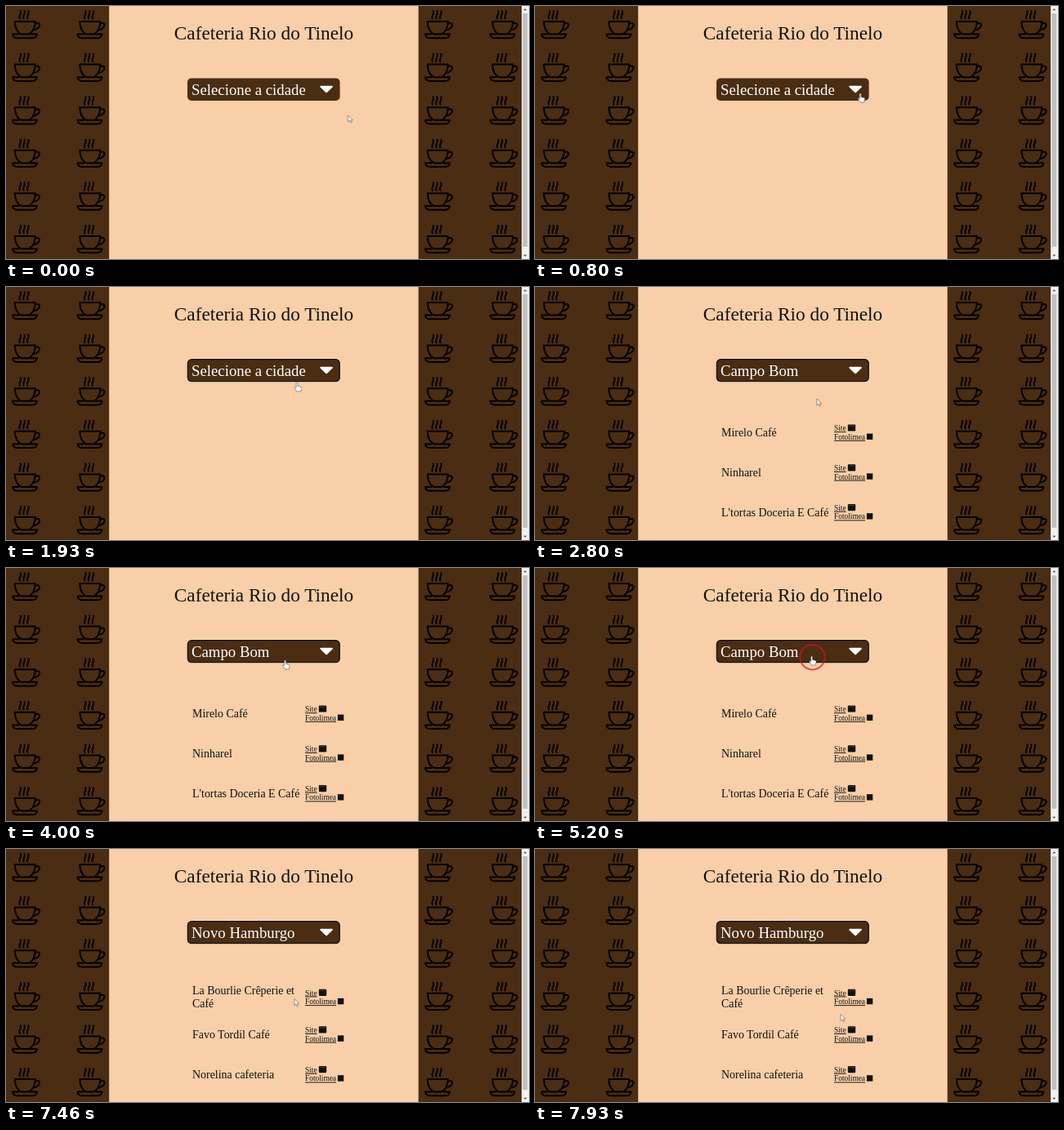
An HTML page for the animation above (8000 ms loop, 640 by 310 pixels).

```html
<!DOCTYPE html>
<html lang="pt-BR">
<head>
<meta charset="utf-8">
<title>Cafeteria</title>
<style>
  html, body { margin: 0; width: 100%; height: 100%; overflow: hidden; background: #4a2d13; }
  svg { display: block; width: 100vw; height: 100vh; }
  text { font-family: "Liberation Serif", "Times New Roman", serif; fill: #111; }
  .title { font-size: 23.3px; text-anchor: middle; }
  .choice { font-size: 18.8px; fill: #fff; }
  .name { font-size: 13.95px; }
  .link { font-size: 9.4px; text-decoration: underline; }

  .none, .focus, .first, .second, .arrow, .hand, .ring, .cursor {
    animation: 8s step-end infinite;
  }
  .none { animation-name: none-on; }
  .focus { animation-name: focus-on; }
  .first { animation-name: first-on; }
  .second { animation-name: second-on; }
  .arrow { animation-name: arrow-on; }
  .hand { animation-name: hand-on; }
  .ring { animation-name: click; }
  .cursor { animation-name: move; }

  @keyframes none-on { 0% { opacity: 1 } 34.125%, 100% { opacity: 0 } }
  @keyframes focus-on { 0% { opacity: 0 } 17.5%, 100% { opacity: 1 } }
  @keyframes first-on { 0% { opacity: 0 } 34.125% { opacity: 1 } 81.6%, 100% { opacity: 0 } }
  @keyframes second-on { 0% { opacity: 0 } 81.6%, 100% { opacity: 1 } }
  @keyframes arrow-on {
    0%, 35% { opacity: 1 } 9.1%, 49.1% { opacity: 0 } 82.5%, 100% { opacity: 1 }
  }
  @keyframes hand-on {
    0%, 35% { opacity: 0 } 9.1%, 49.1% { opacity: 1 } 82.5%, 100% { opacity: 0 }
  }
  @keyframes click {
    0%, 20%, 68.25%, 100% { opacity: 0 }
    17.5%, 65% { opacity: .7 }
    18.3%, 65.75% { opacity: .55 }
    19.15%, 67.5% { opacity: .3 }
  }
  /* The pointer is sampled about every 66 ms while it moves and rests in between. */
  @keyframes move {
    0% { transform: translate(418.5px, 134px) }
    .75% { transform: translate(418.5px, 134px); animation-timing-function: steps(4, jump-start) }
    4.08% { transform: translate(417px, 133px) }
    6.625% { transform: translate(417px, 133px); animation-timing-function: steps(5, jump-start) }
    10.8% { transform: translate(397.5px, 107px); animation-timing-function: steps(7, jump-start) }
    16.6% { transform: translate(386px, 105px) }
    22.5% { transform: translate(386px, 105px); animation-timing-function: steps(3, jump-start) }
    24.9% { transform: translate(355.5px, 117px) }
    34.125% { transform: translate(345px, 137px) }
    45% { transform: translate(345px, 137px); animation-timing-function: steps(7, jump-start) }
    50.8% { transform: translate(341px, 113px); animation-timing-function: steps(4, jump-start) }
    54.1% { transform: translate(338px, 108px) }
    81.6% { transform: translate(332.5px, 166px) }
    88.25% { transform: translate(332.5px, 166px); animation-timing-function: steps(4, jump-start) }
    91.6% { transform: translate(350px, 181px) }
    93.25% { transform: translate(350px, 181px); animation-timing-function: steps(8, jump-start) }
    99.85%, 100% { transform: translate(374px, 202.5px) }
  }
</style>
</head>
<body>
<svg viewBox="0 0 640 310" preserveAspectRatio="none">
  <defs>
    <path id="steam" d="M1 0C3 3.5-2 5.5 0 9.5"/>
    <g id="cup" fill="none" stroke="#000" stroke-width="2" stroke-linecap="round" stroke-linejoin="round">
      <use href="#steam" x="16.8" y="6"/>
      <use href="#steam" x="21.6" y="6"/>
      <use href="#steam" x="26.4" y="6"/>
      <path d="M10.8 19H35.8C35.8 26.5 32.3 32.3 28 34.6H18.6C14 32.3 11 26.5 10.8 19Z"/>
      <path d="M35.8 21.6c4-1.7 6.2.4 4.8 3.4c-1.4 2.8-4 4-7.2 4.4"/>
      <path d="M15.5 34.6H8c.5 2.9 3 4.7 6 4.7H32c3 0 5.5-1.8 6-4.7H30"/>
    </g>
    <g id="column">
      <use href="#cup"/>
      <use href="#cup" y="52.6"/>
      <use href="#cup" y="105.2"/>
      <use href="#cup" y="157.8"/>
      <use href="#cup" y="210.4"/>
      <use href="#cup" y="263"/>
    </g>
    <g id="side">
      <use href="#column"/>
      <use href="#column" x="79.5"/>
    </g>
    <g id="links">
      <text class="link" x="366" y="0">Site</text>
      <rect x="382.8" y="-7.8" width="9.4" height="8.2" rx="1.2" fill="#111"/>
      <path d="M384 -6.2H391" stroke="#f8cfa8" stroke-opacity=".4" stroke-width=".6"/>
      <text class="link" x="366" y="10.7">Fotolimea</text>
      <rect x="405.9" y="3.4" width="7.4" height="7.4" fill="#111"/>
    </g>
  </defs>

  <rect width="640" height="310" fill="#4a2d13"/>
  <use href="#side"/>
  <use href="#side" x="505"/>
  <rect x="126.2" width="378.5" height="310" fill="#f8cfa8"/>

  <g>
    <rect x="631" width="9" height="310" fill="#f1f1f1"/>
    <rect x="632.2" y="9" width="6" height="286" fill="#c1c1c1"/>
    <path d="M633.3 5.3l2-2.3 2 2.3zM633.3 304.7l2 2.3 2-2.3z" fill="#505050"/>
  </g>

  <text class="title" x="315.5" y="40.5">Cafeteria Rio do Tinelo</text>

  <rect x="222" y="88.4" width="186.6" height="27.6" rx="5" fill="#4a2d13"/>
  <g class="focus" fill="none">
    <rect x="221.4" y="87.8" width="187.8" height="28.8" rx="5.6" stroke="#fff" stroke-opacity=".5" stroke-width=".8"/>
    <rect x="222.3" y="88.7" width="186" height="27" rx="4.8" stroke="#101010" stroke-width="1.2"/>
  </g>
  <path d="M385.4 98.8H398.8L392.1 105.2Z" fill="#fff" stroke="#fff" stroke-width="2.2" stroke-linejoin="round"/>

  <text class="choice none" x="227" y="109">Selecione a cidade</text>

  <g class="first">
    <text class="choice" x="227" y="109">Campo Bom</text>
    <text class="name" x="228" y="183">Mirelo Café</text>
    <text class="name" x="228" y="231.8">Ninharel</text>
    <text class="name" x="228" y="280.5">L'tortas Doceria E Café</text>
    <use href="#links" y="176.2"/>
    <use href="#links" y="225"/>
    <use href="#links" y="273.8"/>
  </g>

  <g class="second">
    <text class="choice" x="227" y="109">Novo Hamburgo</text>
    <text class="name" x="228" y="178.3">La Bourlie Crêperie et</text>
    <text class="name" x="228" y="194.4">Café</text>
    <text class="name" x="228" y="231.8">Favo Tordil Café</text>
    <text class="name" x="228" y="280.5">Norelina cafeteria</text>
    <use href="#links" y="179.5"/>
    <use href="#links" y="225"/>
    <use href="#links" y="273.8"/>
  </g>

  <g class="cursor">
    <circle class="ring" cx="1.5" cy="1.2" r="15.2" fill="none" stroke="#d81418" stroke-width="2"/>
    <g fill="#fff" stroke="#333" stroke-width=".5" stroke-linejoin="round">
      <path class="arrow" d="M0 0v8l1.9-1.7 1.2 2.9 1.4-.6-1.2-2.8h2.5z"/>
      <path class="hand" d="M-.4 1q0-1 1-1t1 1v3.5l3.5.8q1.2.3 1 1.5l-.8 4.2h-5l-2.5-4q-.5-1 .5-1.2l1.3 1z"/>
    </g>
  </g>
</svg>
</body>
</html>
```
